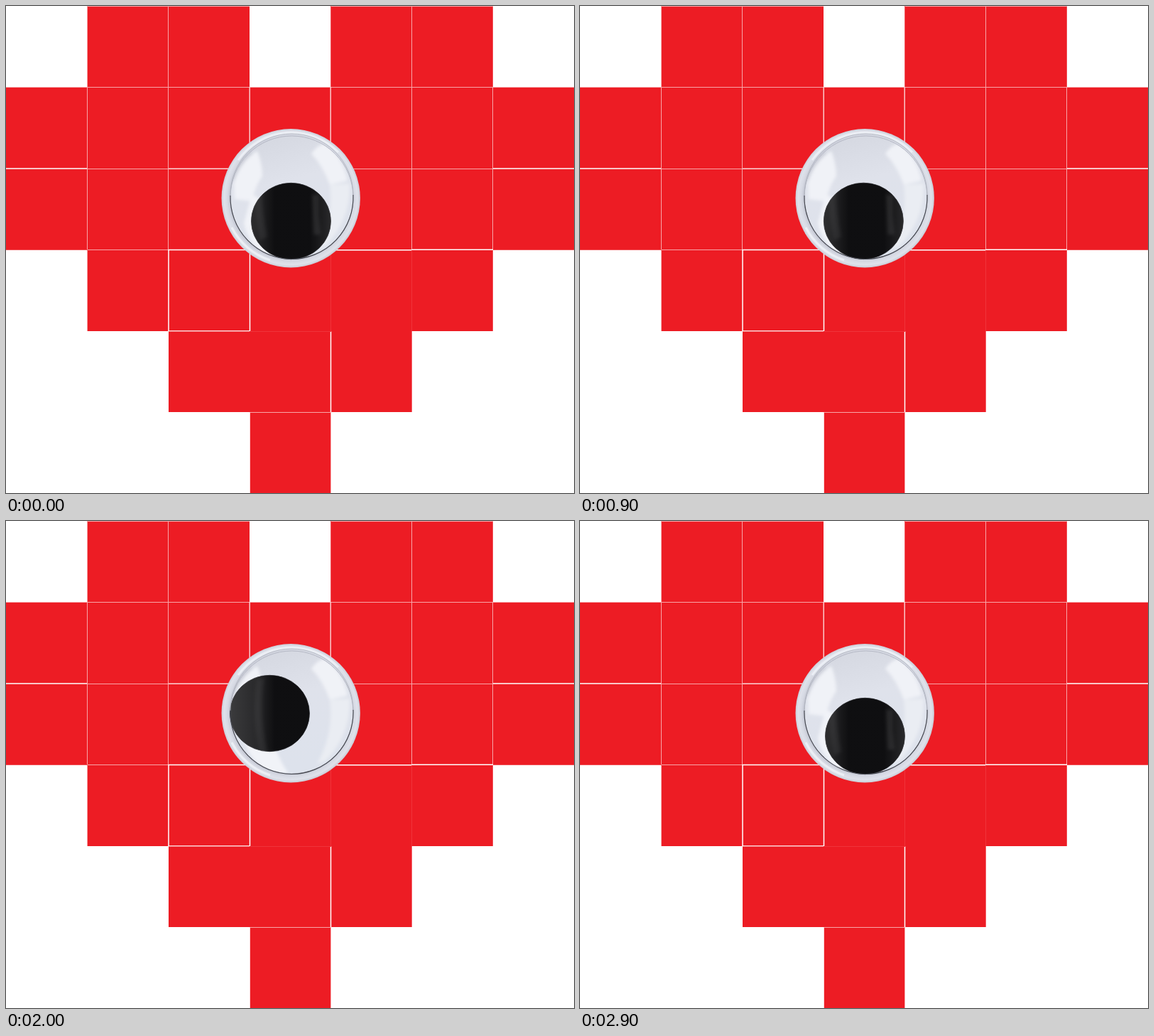
These frames come from a looping animation (800x686 px, 3 s). An HTML page:

```html
<!DOCTYPE html>
<html lang="en">
<head>
<meta charset="utf-8">
<title>Googly heart</title>
<style>
  html, body { margin: 0; width: 100%; height: 100%; overflow: hidden; background: #fff; }
  svg { display: block; width: 800px; height: 686px; }
  .seam { fill: none; stroke: #f8a5a8; }
  .pale { stroke: #fcd5d6; stroke-width: 1.4; }
  .bright { stroke: #fff; stroke-width: 1.5; }
  .faint { stroke: #f0343b; }
</style>
</head>
<body>
<svg viewBox="0 0 800 686">
  <defs>
    <radialGradient id="rim" cx="401" cy="270.5" r="98" gradientUnits="userSpaceOnUse">
      <stop offset=".87" stop-color="#c3c6d2"/>
      <stop offset=".91" stop-color="#d6d9e3"/>
      <stop offset=".96" stop-color="#dfe2eb"/>
      <stop offset="1" stop-color="#c9ccd6"/>
    </radialGradient>
    <linearGradient id="dome" x1="0" y1="0" x2=".25" y2="1">
      <stop offset="0" stop-color="#d3d6df"/>
      <stop offset=".45" stop-color="#dfe2eb"/>
      <stop offset="1" stop-color="#dde2ec"/>
    </linearGradient>
    <linearGradient id="sheen" x1="316" x2="489" y1="0" y2="0" gradientUnits="userSpaceOnUse">
      <stop offset="0" stop-color="#fff" stop-opacity=".2"/>
      <stop offset=".2" stop-color="#fff" stop-opacity=".13"/>
      <stop offset=".36" stop-color="#fff" stop-opacity=".02"/>
      <stop offset=".65" stop-color="#fff" stop-opacity=".02"/>
      <stop offset=".82" stop-color="#fff" stop-opacity=".13"/>
      <stop offset="1" stop-color="#fff" stop-opacity=".1"/>
    </linearGradient>
    <filter id="soft"><feGaussianBlur stdDeviation="2"/></filter>
    <clipPath id="domeClip"><circle cx="402.5" cy="269.5" r="86"/></clipPath>
    <clipPath id="pupilClip"><ellipse class="pupil" rx="56" ry="53.7"/></clipPath>
  </defs>

  <path fill="#ed1c24" d="M114.6 0H343V114H457.3V0H685.8V114H800V343.7H685.8V458H571.7V572H457.4V686H343.8V572H229V458H114.6V343.7H0V114H114.6Z"/>

  <path class="seam" d="M115 .5H343M458 .5H686M0 114.5H800
    M114 229.5H229M480 229.5H686M115 343.5H229M344 572.5H458
    M114.5 114V343M228.5 0V343M571.5 0V343M685.5 114V343"/>
  <path class="seam pale" d="M343.2 114V200M457.2 114V200M229 457.7H343M229 229.2H320"/>
  <path class="seam bright" d="M0 229H114M686 229H800M229 343.5H343M458 343.8H572M572 343.3H686
    M229 343V458M343.5 343V458M457.5 458V572"/>
  <path class="seam faint" d="M457.5 344V458M571.5 344V458M344 458.5H458"/>

  <circle cx="401.2" cy="270.7" r="97.7" fill="url(#rim)"/>
  <circle cx="402.5" cy="269.5" r="86.5" fill="url(#dome)" stroke="#b7bac6"/>
  <path fill="none" stroke="#eceff5" stroke-width="3" d="M327 217A92 92 0 0 1 468 206M318 312A93 93 0 0 0 372 358"/>

  <g clip-path="url(#domeClip)">
    <g filter="url(#soft)">
      <path fill="#f0f2f7" d="M321 250Q330 219 354 204Q361 222 361 240Q352 252 346 275L322 272Z"/>
      <path fill="#f1f3f8" d="M346 266Q366 272 374 300Q380 330 398 356L372 356Q342 338 335 306Z"/>
      <path fill="#f0f2f7" d="M430 208Q440 194 450 194Q474 212 481 246L456 252Q447 226 430 208Z"/>
      <path fill="#eaedf3" d="M456 252L484 250Q486 300 450 338L438 342Q462 300 456 252Z"/>
      <path fill="none" stroke="#c2c5d0" stroke-width="3" d="M319 245A86 86 0 0 1 345 206"/>
    </g>
  </g>

  <ellipse class="pupil" rx="56" ry="53.7" fill="#0a0a0c" stroke="#1b1b1e" stroke-width=".7"/>
  <g clip-path="url(#pupilClip)">
    <rect x="316" y="183" width="173" height="174" fill="url(#sheen)"/>
    <g fill="#fff" filter="url(#soft)">
      <path opacity=".06" d="M353 222H364Q356 270 368 325L358 330Q346 280 353 222Z"/>
      <path opacity=".08" d="M431 266H440V296L443 322H433Z"/>
    </g>
  </g>

  <path fill="none" stroke="#43454d" stroke-width="1.1" d="M316 267A86.5 87 0 0 0 402 356.5A87 87 0 0 0 489 266"/>
  <path fill="none" stroke="#aeb1bc" stroke-width=".8" d="M316 267A86.5 86.5 0 0 1 489 266"/>
</svg>

<script>
  const STEP = 100, REST = 91;
  const orbit = { x: 402, y: 271, rx: 30.5, ry: 32 };
  // Angle of the pupil around the dome for each step, in degrees
  const angles = [
    REST, 109, 109, 130, 155, 180, 180,
    155, 125, 95, 65, 35, 8,
    -20, -47, -73, -105, -105,
    -130, -155, -180, -211, -241, REST,
    68, 48, 36, 48, 70, REST
  ];
  const pupils = document.querySelectorAll('.pupil');

  function draw(now) {
    const rad = angles[Math.floor(now / STEP) % angles.length] * Math.PI / 180;
    for (const p of pupils) {
      p.setAttribute('cx', orbit.x + orbit.rx * Math.cos(rad));
      p.setAttribute('cy', orbit.y + orbit.ry * Math.sin(rad));
    }
  }

  const start = performance.now();
  function loop() {
    draw(performance.now() - start);
    requestAnimationFrame(loop);
  }
  loop();
</script>
</body>
</html>
```
